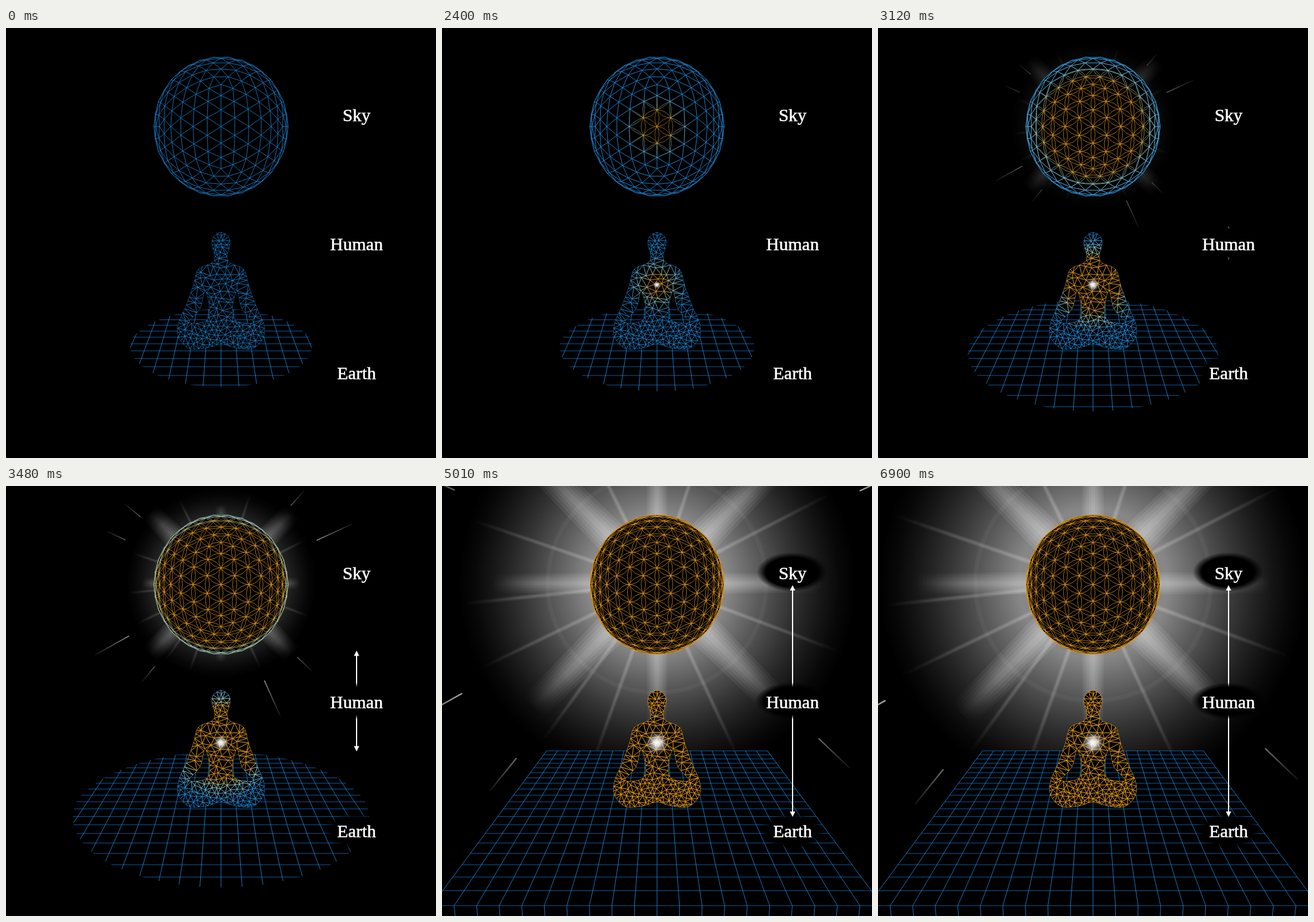
These frames come from a looping animation (720 by 720 pixels, 7860 ms). An HTML page with a canvas:

```html
<!DOCTYPE html>
<html lang="en">
<head>
<meta charset="utf-8">
<title>Sky, Human, Earth</title>
<style>
  html, body { margin: 0; width: 100%; height: 100%; overflow: hidden; background: #000; }
  canvas, svg { position: absolute; left: 0; top: 0; width: 100%; height: 100%; }
  text {
    font: 30px "Liberation Serif", "Times New Roman", serif;
    fill: #fff; stroke: #fff; stroke-width: .55px; text-anchor: middle;
  }
</style>
</head>
<body>
<canvas id="stage" width="720" height="720"></canvas>
<svg viewBox="0 0 720 720">
  <text x="587" y="156">Sky</text>
  <text x="587" y="372">Human</text>
  <text x="587" y="588">Earth</text>
</svg>
<script>
const LOOP = 7860, CX = 360, SKY_Y = 165, HEART_Y = 430;
const BLUE = [30, 140, 222], PALE = [146, 206, 208], ORANGE = [232, 156, 28], GLOW = [235, 245, 240];
const ctx = document.getElementById('stage').getContext('2d');

const clamp = (v, a = 0, b = 1) => Math.min(b, Math.max(a, v));
const rgb = c => `rgb(${c.map(Math.round)})`;
const white = a => `rgba(255,255,255,${a})`;
const mix = (a, b, k) => a.map((v, i) => v + (b[i] - v) * k);
const rad = deg => deg * Math.PI / 180;

let seed = 11;
const rand = () => (seed = (seed * 16807) % 2147483647) / 2147483647;

// Easing and timed ramps
const easeIn = n => p => p ** n;
const easeOut = n => p => 1 - (1 - p) ** n;
const sine = p => (1 - Math.cos(Math.PI * p)) / 2;
const ramp = (t0, t1, a, b, ease) => t => a + (b - a) * ease(clamp((t - t0) / (t1 - t0)));

const bodyWave = ramp(930, 5010, -20, 150, easeIn(1.2));
const skyWave = ramp(1830, 4020, -20, 136, easeOut(1.6));
const heartSize = ramp(1400, 5010, 0, 21, easeOut(1.3));
const groundSize = ramp(1830, 4700, 6.2, 17, easeIn(2));
const coronaSize = ramp(2900, 5600, 135, 358, sine);
const streakSize = ramp(2400, 5600, 100, 398, sine);
const glowLevel = ramp(2600, 3900, 0, 1, sine);
const arrowSize = ramp(2950, 4350, 0, 194, easeOut(1.2));

// Stroke colour of a wave that turns blue lines orange around a point.
function wave(x, y, r) {
  if (r <= -20) return rgb(BLUE);
  const out = r + 20, g = ctx.createRadialGradient(x, y, 0, x, y, out);
  g.addColorStop(0, rgb(mix(GLOW, ORANGE, clamp((r - 12) / 14))));
  if (r > 26) g.addColorStop((r - 18) / out, rgb(ORANGE));
  g.addColorStop(clamp((r - 2) / out, .5), rgb(PALE));
  g.addColorStop(1, rgb(BLUE));
  return g;
}
const meshWidth = r => .48 + .22 * clamp(r / 100);

// ---- Sky: a divided icosahedron seen along the middle of an edge
function makeSphere() {
  const p = (1 + Math.sqrt(5)) / 2, v = [], out = [], dist = 6.1, N = 6;
  for (const a of [1, -1]) for (const b of [p, -p]) v.push([0, a, b], [a, b, 0], [b, 0, a]);
  const near = (a, b) => Math.abs(Math.hypot(a[0] - b[0], a[1] - b[1], a[2] - b[2]) - 2) < .01;
  const flat = q => {
    const l = Math.hypot(...q), [x, y, z] = q.map(c => c / l);
    const s = 112.3 * Math.sqrt(dist * dist - 1) / (dist - z);
    return [CX + x * s, SKY_Y - y * s * 1.04, z];
  };
  const face = (A, B, C) => {
    const at = (i, j) => flat(A.map((a, m) => a + (B[m] - a) * i / N + (C[m] - a) * j / N));
    for (let i = 0; i < N; i++) for (let j = 0; i + j < N; j++) {
      out.push([at(i, j), at(i + 1, j), at(i, j + 1)]);
      if (i + j < N - 1) out.push([at(i + 1, j), at(i + 1, j + 1), at(i, j + 1)]);
    }
  };
  for (let i = 0; i < 12; i++) for (let j = i + 1; j < 12; j++) for (let k = j + 1; k < 12; k++)
    if (near(v[i], v[j]) && near(v[j], v[k]) && near(v[i], v[k])) face(v[i], v[j], v[k]);
  return out.filter(t => t[0][2] + t[1][2] + t[2][2] > 3 / dist);
}
const sphere = makeSphere();

function drawSky(t) {
  const r = skyWave(t);
  ctx.fillStyle = '#000';
  ctx.beginPath();
  ctx.ellipse(CX, SKY_Y, 112, 116.5, 0, 0, 7);
  ctx.fill();
  ctx.beginPath();
  for (const tri of sphere) for (let i = 0; i < 3; i++) {
    const a = tri[i], b = tri[(i + 1) % 3], c = tri[(i + 2) % 3];
    const mx = (a[0] + b[0]) / 2, my = (a[1] + b[1]) / 2;
    // each side bends away from the opposite corner to form petals
    const k = .31 * clamp((r + 5 - Math.hypot(mx - CX, my - SKY_Y)) / 20);
    ctx.moveTo(a[0], a[1]);
    ctx.quadraticCurveTo(mx + (mx - c[0]) * k, my + (my - c[1]) * k, b[0], b[1]);
  }
  ctx.lineWidth = meshWidth(r);
  ctx.strokeStyle = wave(CX, SKY_Y, r);
  ctx.stroke();
}

// ---- Corona and streaks
function ray(deg, len, w, alpha) {
  ctx.save();
  ctx.translate(CX, 163);
  ctx.rotate(rad(deg));
  const g = ctx.createLinearGradient(90, 0, len, 0);
  g.addColorStop(0, white(alpha / 5));
  g.addColorStop(.6, white(alpha / 8));
  g.addColorStop(1, white(0));
  ctx.fillStyle = g;
  for (let i = 1; i <= 5; i++) {
    const h = w * i / 10;
    ctx.beginPath();
    ctx.moveTo(60, -h); ctx.lineTo(len, -h * .85); ctx.lineTo(len, h * .85); ctx.lineTo(60, h);
    ctx.fill();
  }
  ctx.restore();
}

function drawCorona(t) {
  const R = coronaSize(t), z = R / 333;
  ctx.save();
  ctx.globalAlpha = glowLevel(t);
  const g = ctx.createRadialGradient(CX, 163, R * .35, CX, 163, R);
  for (let s = 0; s <= 1; s += .125) g.addColorStop(s, white(.53 * (1 - s) ** 1.35));
  ctx.fillStyle = g;
  ctx.fillRect(0, 0, 720, 720);
  ctx.strokeStyle = white(.035);
  ctx.lineWidth = 7 * z;
  ctx.beginPath();
  ctx.arc(CX, 163, R * .55, 0, 7);
  ctx.stroke();
  for (let k = 0; k < 8; k++) {
    if (k % 2) ray(45 * k, R * .72 + 55, 24 + 34 * z, .5);
    else ray(45 * k, R * .83, 8 + 28 * z, .42);
  }
  // thin rays: an even fan plus two strays at the lower left
  for (let k = 0; k < 10; k++) ray(k < 8 ? 20.5 + 44.6 * k : 126 + 48 * (k - 8), R * .98, 3 + 6 * z, .28);
  ctx.restore();
}

const STREAKS = [-24.8, 150.8, 65.7, 205, 220, -48.5, 129, 43.6];
function drawStreaks(t) {
  const r = streakSize(t), glow = glowLevel(t) ** .6;
  ctx.lineWidth = 1 + r / 280;
  STREAKS.forEach((deg, i) => {
    const long = i < 3, a = glow * (long ? .65 : .42), reach = long ? 1.37 : 1.19;
    const c = Math.cos(rad(deg)) * r, s = Math.sin(rad(deg)) * r;
    const ends = [CX + c, SKY_Y + s, CX + c * reach, SKY_Y + s * reach];
    const g = ctx.createLinearGradient(...ends);
    g.addColorStop(0, white(a));
    g.addColorStop(1, white(a * .15));
    ctx.strokeStyle = g;
    ctx.beginPath();
    ctx.moveTo(ends[0], ends[1]); ctx.lineTo(ends[2], ends[3]);
    ctx.stroke();
  });
}

// ---- Earth: 20 by 20 cells in perspective, u across, v towards the viewer
function place(u, v) {
  const h = 1 / (.004016 - .0001024 * v);
  return [CX + u * h * .0743, 194.6 + h];
}
const line = (a, b) => { ctx.moveTo(...a); ctx.lineTo(...b); };

function drawEarth(t) {
  const r = groundSize(t);
  ctx.fillStyle = '#000';
  ctx.beginPath();
  for (const v of [0, 21]) for (const s of [-1, 1]) ctx.lineTo(...place(v ? -10 * s : 10 * s, v));
  ctx.fill();
  ctx.save();
  ctx.beginPath();
  for (let i = 0; i < 180; i++) {
    const s = Math.sin(rad(i * 2)), d = Math.max(0, r * Math.abs(s) - .5);
    ctx.lineTo(...place(r * Math.cos(rad(i * 2)), 9.5 + d * Math.sign(s)));
  }
  ctx.clip();
  ctx.lineWidth = .8;
  ctx.strokeStyle = '#1272c8';
  ctx.beginPath();
  for (let v = 0; v <= 20; v++) line(place(-10, v), place(10, v));
  ctx.stroke();
  ctx.strokeStyle = '#2196ee';
  ctx.beginPath();
  for (let u = -10; u <= 10; u++) {
    const p = place(u, 20);
    line(place(u, 0), p);
    line(p, [CX + (p[0] - CX) * .994, 721]);
  }
  ctx.stroke();
  ctx.restore();
}

// ---- Human: triangle mesh inside a smooth outline, given as offsets from the middle
const HALF = [
  [0, 342], [13, 350], [15, 363], [10, 383], [16, 394], [38, 404], [46, 430],
  [58, 464], [71, 494], [71, 518], [52, 537], [22, 535], [0, 529]
];
const GAP = [[27, 440], [19, 468], [24, 490], [54, 493], [35, 470]];
const side = (pts, k) => pts.map(([x, y]) => [CX + x * k, y]);

function spline(p, step) {
  const out = [], n = p.length;
  for (let i = 0; i < n; i++) {
    const [a, b, c, d] = [n - 1, 0, 1, 2].map(o => p[(i + o) % n]);
    const m = Math.max(1, Math.round(Math.hypot(c[0] - b[0], c[1] - b[1]) / step));
    for (let j = 0; j < m; j++) {
      const s = j / m;
      out.push([0, 1].map(q => b[q] + .5 * s * (c[q] - a[q] + s * (2 * a[q] - 5 * b[q] + 4 * c[q] - d[q]
        + s * (3 * (b[q] - c[q]) + d[q] - a[q])))));
    }
  }
  return out;
}

function triangulate(points) {
  const n = points.length, p = [...points, [-2000, -2000], [4000, -2000], [360, 6000]];
  const circle = (i, j, k) => {
    const [ax, ay] = p[i], bx = p[j][0] - ax, by = p[j][1] - ay, cx = p[k][0] - ax, cy = p[k][1] - ay;
    const d = 2 * (bx * cy - by * cx), b = bx * bx + by * by, c = cx * cx + cy * cy;
    const x = (cy * b - by * c) / d, y = (bx * c - cx * b) / d;
    return { ids: [i, j, k], x: ax + x, y: ay + y, r: x * x + y * y };
  };
  let tris = [circle(n, n + 1, n + 2)];
  for (let i = 0; i < n; i++) {
    const rim = new Map();
    tris = tris.filter(t => {
      if ((p[i][0] - t.x) ** 2 + (p[i][1] - t.y) ** 2 > t.r) return true;
      t.ids.forEach((a, m) => {
        const b = t.ids[(m + 1) % 3], key = Math.min(a, b) + '-' + Math.max(a, b);
        if (rim.has(key)) rim.delete(key); else rim.set(key, [a, b]);
      });
      return false;
    });
    for (const [a, b] of rim.values()) tris.push(circle(a, b, i));
  }
  return tris.filter(t => Math.max(...t.ids) < n).map(t => t.ids.map(i => p[i]));
}

function makeBody() {
  const outline = [...side(HALF, 1), ...side(HALF.slice(1, -1), -1).reverse()];
  const loops = [outline, side(GAP, 1), side(GAP, -1)].map(l => spline(l, 7));
  const shape = new Path2D(), mesh = new Path2D();
  const trace = (path, pts) => { pts.forEach(q => path.lineTo(...q)); path.closePath(); };
  for (const l of loops) { shape.moveTo(...l[0]); trace(shape, l); }
  const inside = (x, y) => ctx.isPointInPath(shape, x, y, 'evenodd');
  const pts = loops.flat().map(q => q.map(c => c + (rand() - .5) * .3));
  for (let y = 347, row = 0; y < 538; row++) {
    const step = y > 385 && y < 485 ? 11.5 : 8.5;
    for (let x = 284 + row % 2 * step / 2; x < 436; x += step) {
      const q = [x + (rand() - .5) * step * .7, y + (rand() - .5) * step * .7];
      if (inside(...q) && pts.every(o => Math.hypot(o[0] - q[0], o[1] - q[1]) > step * .45)) pts.push(q);
    }
    y += step * .87;
  }
  for (const t of triangulate(pts)) {
    const mid = [0, 1].map(i => (t[0][i] + t[1][i] + t[2][i]) / 3);
    if (inside(...mid)) { mesh.moveTo(...t[0]); trace(mesh, t); }
  }
  return { shape, mesh };
}
const body = makeBody();

function drawHuman(t) {
  const r = bodyWave(t), size = heartSize(t);
  ctx.fillStyle = '#000';
  ctx.fill(body.shape, 'evenodd');
  ctx.strokeStyle = wave(CX, HEART_Y, r);
  ctx.lineWidth = meshWidth(r);
  ctx.stroke(body.mesh);
  if (size < .1) return;
  const g = ctx.createRadialGradient(CX, HEART_Y, 0, CX, HEART_Y, size);
  for (let s = 0; s <= 1; s += .25) g.addColorStop(s, white(sine(1 - s)));
  ctx.fillStyle = g;
  ctx.beginPath();
  ctx.arc(CX, HEART_Y, size, 0, 7);
  ctx.fill();
}

// ---- Labels: soft dark patches and the growing arrow
function patch(y, rx, ry) {
  ctx.save();
  ctx.translate(586, y);
  ctx.scale(rx, ry);
  const g = ctx.createRadialGradient(0, 0, 0, 0, 0, 1);
  g.addColorStop(.75, '#000');
  g.addColorStop(1, 'rgba(0,0,0,0)');
  ctx.fillStyle = g;
  ctx.fillRect(-1, -1, 2, 2);
  ctx.restore();
}
function drawLabels(t) {
  patch(144, 59, 33);
  patch(578, 54, 30);
  const h = arrowSize(t);
  if (h > 10) {
    ctx.fillStyle = '#fff';
    ctx.fillRect(586, 360 - h + 6, 2, 2 * h - 12);
    for (const s of [-1, 1]) {
      const y = 360 + s * h;
      ctx.beginPath();
      ctx.moveTo(587, y); ctx.lineTo(591.5, y - 9 * s); ctx.lineTo(582.5, y - 9 * s);
      ctx.fill();
    }
  }
  patch(360, 62, 31);
}

function draw(now) {
  const t = now % LOOP;
  ctx.fillStyle = '#000';
  ctx.fillRect(0, 0, 720, 720);
  drawCorona(t);
  drawStreaks(t);
  drawSky(t);
  drawEarth(t);
  drawHuman(t);
  drawLabels(t);
  requestAnimationFrame(draw);
}
draw(0);
</script>
</body>
</html>
```
